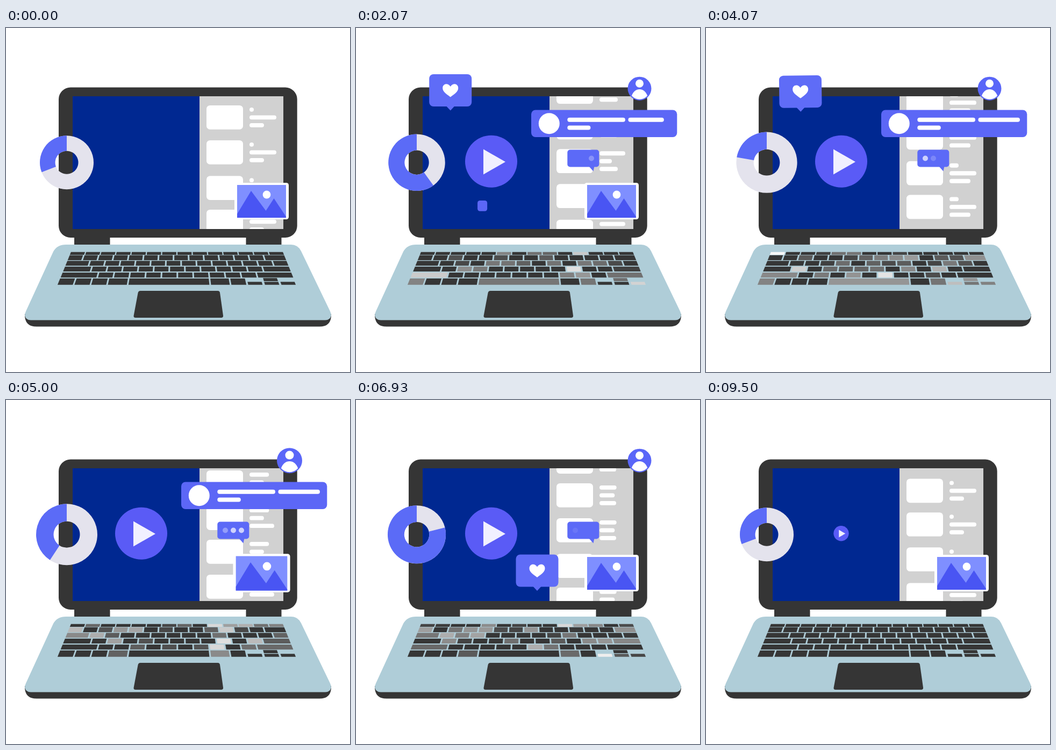
Animation, 640 px wide and 640 px high, one loop 9570 ms. Source, as an HTML page:

```html
<!DOCTYPE html>
<html lang="en">
<head>
<meta charset="utf-8">
<title>Laptop scene</title>
<style>
html, body { margin: 0; width: 100%; height: 100%; overflow: hidden; background: #fff; }
svg { display: block; width: 100vw; height: 100vh; }
</style>
</head>
<body>
<svg id="stage" viewBox="0 0 640 640" xmlns="http://www.w3.org/2000/svg">
  <defs>
    <clipPath id="pane"><rect x="360" y="127" width="156" height="247"/></clipPath>
    <g id="badge">
      <path d="M-8 29h16l-8 8.5z"/>
      <rect x="-39.5" y="-30" width="79" height="60" rx="8"/>
      <path fill="#fff" d="M0 12.5C-9 6-14.5 2-14.5-4.200C-14.500-13-4-14.500 0-7C4-14.500 14.500-13 14.500-4.200C14.500 2 9 6 0 12.500z"/>
    </g>
  </defs>

  <rect x="127" y="386" width="66.500" height="20" fill="#353535"/>
  <rect x="446.500" y="386" width="66" height="20" fill="#353535"/>
  <rect x="98" y="110.500" width="443.700" height="279.500" rx="22" fill="#353535"/>
  <rect x="124" y="127" width="392" height="247" fill="#002891"/>
  <rect x="360" y="127" width="156" height="247" fill="#d1d1d1"/>
  <g id="list" clip-path="url(#pane)" fill="#fff"></g>

  <path fill="#353535" d="M35 532Q34 555.500 57 555.500H583Q606 555.500 605 532z"/>
  <path fill="#afcdd8" d="M112 403H530Q543 403 549 415L603 527Q605 531 605 535Q603 543.500 594 543.500H46Q37 543.500 35 535Q35 531 37 527L88 416Q95 403 112 403z"/>
  <path fill="#353535" d="M250 489H394Q397.500 489 398 492.500L404 535Q404.500 539 400.500 539H241Q237 539 237.600 535L245.500 493Q246.300 489 250 489z"/>
  <g id="keys"></g>

  <g id="play">
    <circle cx="251.500" cy="248.300" r="48.500" fill="#5a5bf6"/>
    <path d="M237 225.500L278 249L237 272.500z" fill="#f1f0ff"/>
  </g>
  <rect id="pillA" y="321" height="19.800" rx="4.500" fill="#5c67f6"/>
  <g id="photo">
    <rect x="425" y="288" width="101" height="68" rx="4.500" fill="#fff"/>
    <rect x="430" y="292" width="91" height="61" fill="#7f8fff"/>
    <path d="M430 346L456 303L483.500 340L498.500 317L521 351V353H430z" fill="#4955f3"/>
    <circle cx="485" cy="310" r="7.400" fill="#fff"/>
  </g>
  <g id="chat">
    <path d="M433 257L441.500 266.500L443.500 257z" fill="#5c6af7"/>
    <rect x="393.300" y="226.500" width="59" height="32" rx="5" fill="#5c6af7"/>
    <g id="dots" fill="#fff">
      <circle cx="408" cy="242.500" r="5"/>
      <circle cx="423" cy="242.500" r="5"/>
      <circle cx="438" cy="242.500" r="5"/>
    </g>
  </g>
  <g id="bar">
    <rect x="326" y="152.500" width="271.300" height="50.500" rx="8" fill="#5c67f6"/>
    <circle cx="359.300" cy="177.800" r="19.500" fill="#fff"/>
    <g id="barLines" fill="#fff">
      <rect x="393.300" y="166.700" height="8" rx="4"/>
      <rect x="506.500" y="166.700" height="8" rx="4"/>
      <rect x="393.300" y="181.500" height="8" rx="4"/>
    </g>
  </g>
  <rect id="pillB" y="155" height="19.800" rx="4.500" fill="#f9f9fd"/>
  <g id="user">
    <circle cx="527.500" cy="112.700" r="22" fill="#5a66f8"/>
    <circle cx="527.500" cy="103.200" r="7.500" fill="#fff"/>
    <path fill="#fff" d="M512.800 126C516 118 521 114 527.500 114S539 118 542.200 126Q536 132.800 527.500 132.800T512.800 126z"/>
  </g>
  <use id="likeA" href="#badge" fill="#5f6cf7"/>
  <use id="likeB" href="#badge" fill="#5f6cf7"/>
  <path id="ring" fill="#e4e3ed" fill-rule="evenodd"/>
  <path id="slice" fill="#5b6bf7"/>
</svg>

<script>
const LOOP = 9.57;
const $ = id => document.getElementById(id);
const clamp = (v, lo = 0, hi = 1) => Math.min(hi, Math.max(lo, v));
const span = (t, a, b) => clamp((t - a) / (b - a));
const mod = (v, n) => ((v % n) + n) % n;

function add(parent, tag, attrs) {
  const el = document.createElementNS("http://www.w3.org/2000/svg", tag);
  set(el, attrs);
  parent.appendChild(el);
  return el;
}
function set(el, attrs) {
  for (const name in attrs) el.setAttribute(name, attrs[name]);
}
function show(el, on) {
  el.style.display = on ? "" : "none";
  return on;
}

const backOut = (k, s) => 1 + (s + 1) * (k - 1) ** 3 + s * (k - 1) ** 2;
const outCubic = k => 1 - (1 - k) ** 3;

// Pops in over [a, b] and back out over [c, d].
function pop(t, a, b, c, d, s = 1.5) {
  return t < c ? backOut(span(t, a, b), s) : backOut(1 - span(t, c, d), s);
}
function scaleAt(el, cx, cy, s) {
  if (show(el, s > 0.004))
    set(el, { transform: `translate(${cx} ${cy}) scale(${s}) translate(${-cx} ${-cy})` });
}

// Smooth curve through [time, value] points.
function curve(pts, t) {
  const n = pts.length - 1;
  let i = 0;
  while (i < n - 1 && t > pts[i + 1][0]) i++;
  const slope = j => {
    const p = pts[Math.max(0, j - 1)], q = pts[Math.min(n, j + 1)];
    return (q[1] - p[1]) / (q[0] - p[0]);
  };
  const [t0, a] = pts[i], [t1, b] = pts[i + 1], h = t1 - t0, k = span(t, t0, t1);
  return a + (b - a) * k * k * (3 - 2 * k)
    + h * k * (1 - k) * ((1 - k) * slope(i) - k * slope(i + 1));
}

// Keyboard
let seed = 41;
const rnd = () => (seed = (seed * 16807) % 2147483647) / 2147483647;
const run = n => Array(n).fill(1);
const keys = [];

function addKey(x, w, top, bottom) {
  const mid = (top + bottom) / 2;
  const at = (px, y) => `${(318 + (px - 318) * (y + 68) / (mid + 68)).toFixed(2)} ${y}`;
  const d = `M${at(x, top)}L${at(x + w, top)}L${at(x + w, bottom)}L${at(x, bottom)}z`;
  keys.push({
    el: add($("keys"), "path", { d }),
    period: 1.3 + rnd() * 0.9, phase: rnd(), peak: 0.3 + rnd() * 0.7
  });
}
function addRow(top, bottom, sizes, gap = 3) {
  const half = 0.4066 * ((top + bottom) / 2 + 68);
  const unit = (2 * half + gap) / sizes.reduce((a, b) => a + b);
  let x = 318 - half;
  for (const s of sizes) {
    addKey(x, s * unit - gap, top, bottom);
    x += s * unit;
  }
}
addRow(416.7, 422, run(14), 2.2);
addRow(422.7, 432, [...run(13), 1.45]);
addRow(433.2, 442.3, [1.55, ...run(13)]);
addRow(444, 453, [1.8, ...run(11), 1.78]);
addRow(455, 464.3, [2.33, ...run(10), 2.28]);
let keyX = 98.3;
for (const w of [28, 28, 27.5, 35, 149, 34.5, 27.5]) {
  addKey(keyX, w, 466, 477.8);
  keyX += w + 3;
}
addKey(479, 26, 465.2, 471);
for (const x of [450, 481, 511.5]) addKey(x, 26.5, 472.2, 477.8);

function drawKeys(t) {
  const env = Math.min(span(t, 0, 0.5), 1 - span(t, 9, 9.45));
  for (const k of keys) {
    const wave = 1 - Math.abs(2 * mod(t / k.period + k.phase, 1) - 1);
    const a = clamp(2.4 * wave - 1.25) * k.peak * env;
    const g = Math.round(54 + 197 * a);
    k.el.setAttribute("fill", `rgb(${g},${g},${g})`);
  }
}

// Scrolling list
const offsets = [0, 65, 131.3], groupH = 194;
const lineCurves = [
  [[0, 8], [1.2, 34], [2.07, 48], [2.93, 20], [4.07, 17], [5.93, 50], [7.86, 10.5], [9.5, 8]],
  [[0, 50], [1.1, 50], [2.07, 23], [2.93, 50], [4.07, 50], [5.93, 10], [7.86, 50], [9.5, 50]],
  [[0, 27], [2.07, 34], [2.93, 50.5], [4.07, 39], [5.93, 50], [7.86, 14], [9.5, 27]]
];
const cards = Array.from({ length: 9 }, () => {
  const g = add($("list"), "g", {});
  add(g, "rect", { x: 373, y: 0, width: 68, height: 44.7, rx: 6.5 });
  const lines = [4, 18.5, 33].map(y => add(g, "rect", { x: 453, y, height: 7.8, rx: 3.9 }));
  return { g, lines };
});
function drawList(t) {
  const base = mod(144 - 54.4 * t, groupH) - groupH;
  const widths = lineCurves.map(c => clamp(curve(c, t), 8, 50.5));
  cards.forEach((c, i) => {
    const y = base + offsets[i % 3] + groupH * Math.floor(i / 3);
    set(c.g, { transform: `translate(0 ${y.toFixed(2)})` });
    c.lines.forEach((l, j) => set(l, { width: widths[j] }));
  });
}

// Ring chart
const share = [[0, 111], [1.2, 215], [2.07, 216], [2.93, 187], [4.07, 80],
  [5.93, 238], [7, 285], [7.86, 268], [9.5, 111]];
function drawRing(t) {
  const r = 50 + 7 * Math.sin(Math.PI * t / LOOP) ** 2, q = r * 0.43;
  const cx = 113, cy = 250.2;
  const deg = curve(share, t), a = deg * Math.PI / 180, big = deg > 180 ? 1 : 0;
  const at = n => `${cx - n * Math.sin(a)} ${cy - n * Math.cos(a)}`;
  const disc = n => `M${cx} ${cy - n}a${n} ${n} 0 1 0 .01 0z`;
  set($("ring"), { d: disc(r) + disc(q) });
  set($("slice"), {
    d: `M${cx} ${cy - r}A${r} ${r} 0 ${big} 0 ${at(r)}L${at(q)}A${q} ${q} 0 ${big} 1 ${cx} ${cy - q}z`
  });
}

// Badge pops in, then drops away.
function drawLike(el, t, x, y, start, fall, dur, dist) {
  const s = backOut(span(t, start, start + 0.5), 1.2);
  const k = span(t, fall, fall + dur);
  if (!show(el, s > 0.004 && k < 1)) return;
  set(el, {
    transform: `translate(${x} ${y + dist * k ** 2.4}) rotate(${-6 * k}) scale(${s})`,
    opacity: 1 - span(k, 0.7, 1)
  });
}

function drawPill(el, t, from, to, u, extra, fade) {
  if (!show(el, t > from && t < to)) return;
  const x = 286 + 112 * u + 36 * u ** 3;
  const w = Math.max(0, 18 + extra + 20 * (u + 0.433));
  set(el, { x: x - w / 2, width: w, opacity: 1 - span(t, to - fade, to) });
}

const dotTimes = [[0.5, 0.75, 1.7, 1.9], [0.8, 1.05, 1.8, 2], [1.4, 1.65, 1.95, 2.15]];
function drawDots(t) {
  const p = mod(t, 3.2);
  dotTimes.forEach(([a, b, c, d], i) =>
    set($("dots").children[i], { opacity: 0.7 * span(p, a, b) * (1 - span(p, c, d)) }));
}

function userScale(t) {
  const pulse = (a, b, h) => h * Math.sin(Math.PI * span(t, a, b));
  return pop(t, 0.85, 1.35, 8.75, 9.27, 1.4) + pulse(4.6, 5.5, 0.07) + pulse(6.05, 6.6, 0.05);
}

function draw(t) {
  drawList(t);
  drawKeys(t);
  drawRing(t);

  const shrink = 1 - span(t, 9.2, 9.55) ** 2.3;
  scaleAt($("play"), 251.5, 248.3, backOut(span(t, 0.07, 0.6), 1.2) * shrink);

  const back = t < 4.1 ? 1 - span(t, 3.3, 3.75) ** 2 : backOut(span(t, 4.7, 5.2), 1.2);
  scaleAt($("photo"), 475.5, 322, back);

  scaleAt($("chat"), 423, 244, pop(t, 0.6, 1.1, 8.6, 9));
  drawDots(t);

  scaleAt($("bar"), 461.7, 177.8, pop(t, 1.15, 1.6, 6.3, 6.75, 0.3));
  [[1.35, 2.15, 107.7], [1.5, 2.7, 77.5], [1.4, 2.25, 43.5]].forEach(([a, b, w], i) =>
    set($("barLines").children[i], { width: w * outCubic(span(t, a, b)) }));

  scaleAt($("user"), 527.5, 112.7, userScale(t));
  drawLike($("likeA"), t, 175.7, 116, 0.4, 3.95, 1, 367);
  drawLike($("likeB"), t, 337, 317.5, 5.1, 9, 0.47, 160);
  drawPill($("pillA"), t, 1.15, 3.95, t - 2.5, 0, 0.08);
  drawPill($("pillB"), t, 7.05, 8.95, 8.57 - t, 3, 0.35);
}

function tick() {
  draw((performance.now() / 1000) % LOOP);
  requestAnimationFrame(tick);
}
draw(0);
requestAnimationFrame(tick);
</script>
</body>
</html>
```
